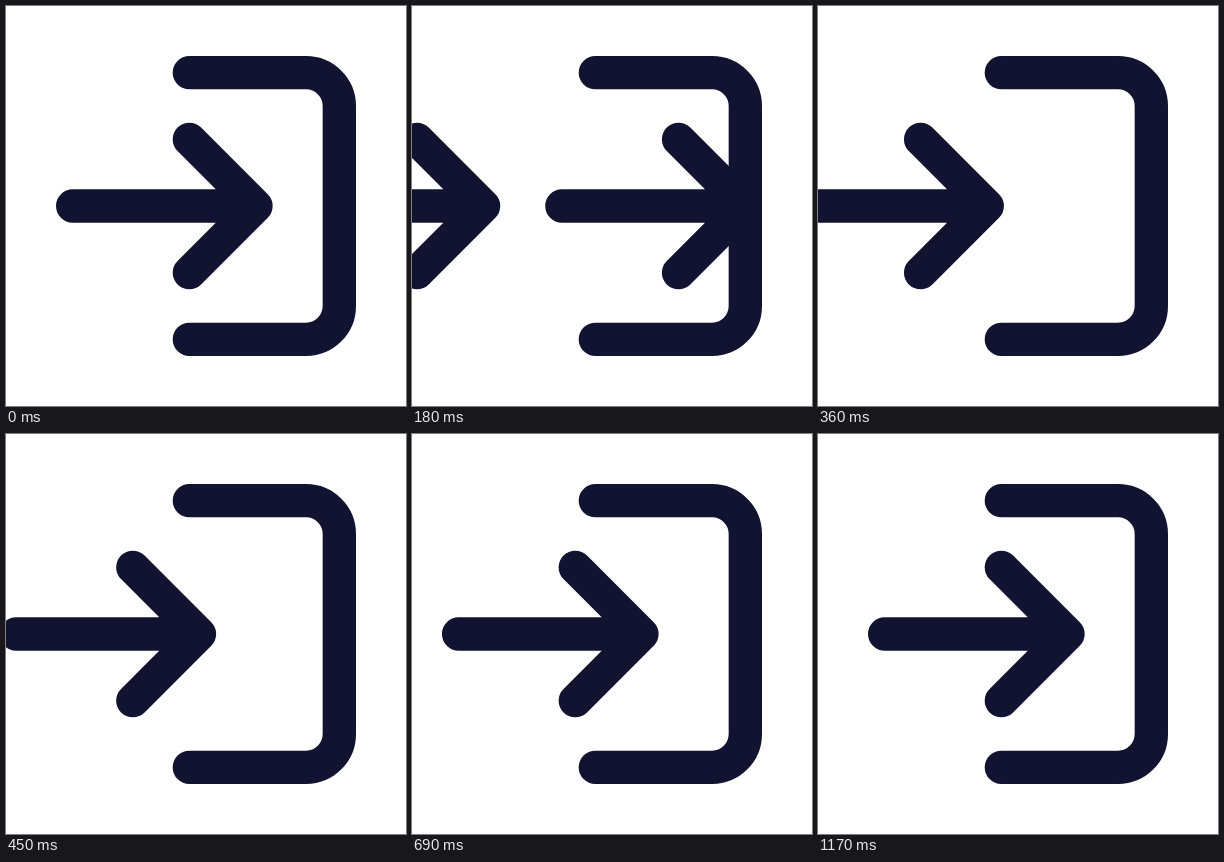
Animation of 400x400 px, one loop 2230 ms. Source, as an HTML page with a canvas:

```html
<!DOCTYPE html>
<html lang="en">
<head>
<meta charset="utf-8">
<title>Enter arrow</title>
<style>
  html, body { margin: 0; width: 100%; height: 100%; overflow: hidden; background: #fff; }
  canvas { display: block; width: 100%; height: 100%; }
</style>
</head>
<body>
<canvas id="stage" width="400" height="400"></canvas>
<script>
const ctx = document.getElementById('stage').getContext('2d');
const LOOP = 2230, STEP = 30, LAST = 39;
const UNIT = 400 / 24;
const INK = '#121331';
const WALL = 20 * UNIT;

const door = new Path2D('M11 4h7a2 2 0 0 1 2 2v12a2 2 0 0 1-2 2h-7');
const arrow = new Path2D('M4 12H15M11 8l4 4l-4 4');

// Eased value 0..1 for progress p along a cubic Bezier.
function bezier(p, x1, y1, x2, y2) {
  if (p <= 0) return 0;
  if (p >= 1) return 1;
  const at = (u, a, b) => 3 * u * (1 - u) ** 2 * a + 3 * u * u * (1 - u) * b + u ** 3;
  let lo = 0, hi = 1;
  for (let i = 0; i < 40; i++) {
    const mid = (lo + hi) / 2;
    if (at(mid, x1, x2) < p) lo = mid; else hi = mid;
  }
  return at(lo, y1, y2);
}

// Horizontal offsets in pixels after k steps.
const leaving = k => 83.2 * (k / 6) ** 2.053;
const arriving = k => -366 * (1 - bezier((k - 3.31) / 36.32, 0.017, 0.6, 0.154, 1));

function stroke(path, dx = 0) {
  ctx.save();
  ctx.translate(dx, 0);
  ctx.scale(UNIT, UNIT);
  ctx.lineWidth = 2;
  ctx.lineCap = ctx.lineJoin = 'round';
  ctx.strokeStyle = INK;
  ctx.stroke(path);
  ctx.restore();
}

function draw(ms) {
  const k = Math.min(LAST, Math.floor((ms % LOOP) / STEP));
  ctx.fillStyle = '#fff';
  ctx.fillRect(0, 0, 400, 400);

  // Arrows vanish behind the wall.
  ctx.save();
  ctx.beginPath();
  ctx.rect(0, 0, WALL, 400);
  ctx.clip();
  if (k < LAST) stroke(arrow, leaving(k));
  stroke(arrow, k < LAST ? arriving(k) : 0);
  ctx.restore();

  stroke(door);
}

const start = performance.now();
function tick() {
  draw(performance.now() - start);
  requestAnimationFrame(tick);
}
tick();
</script>
</body>
</html>
```
